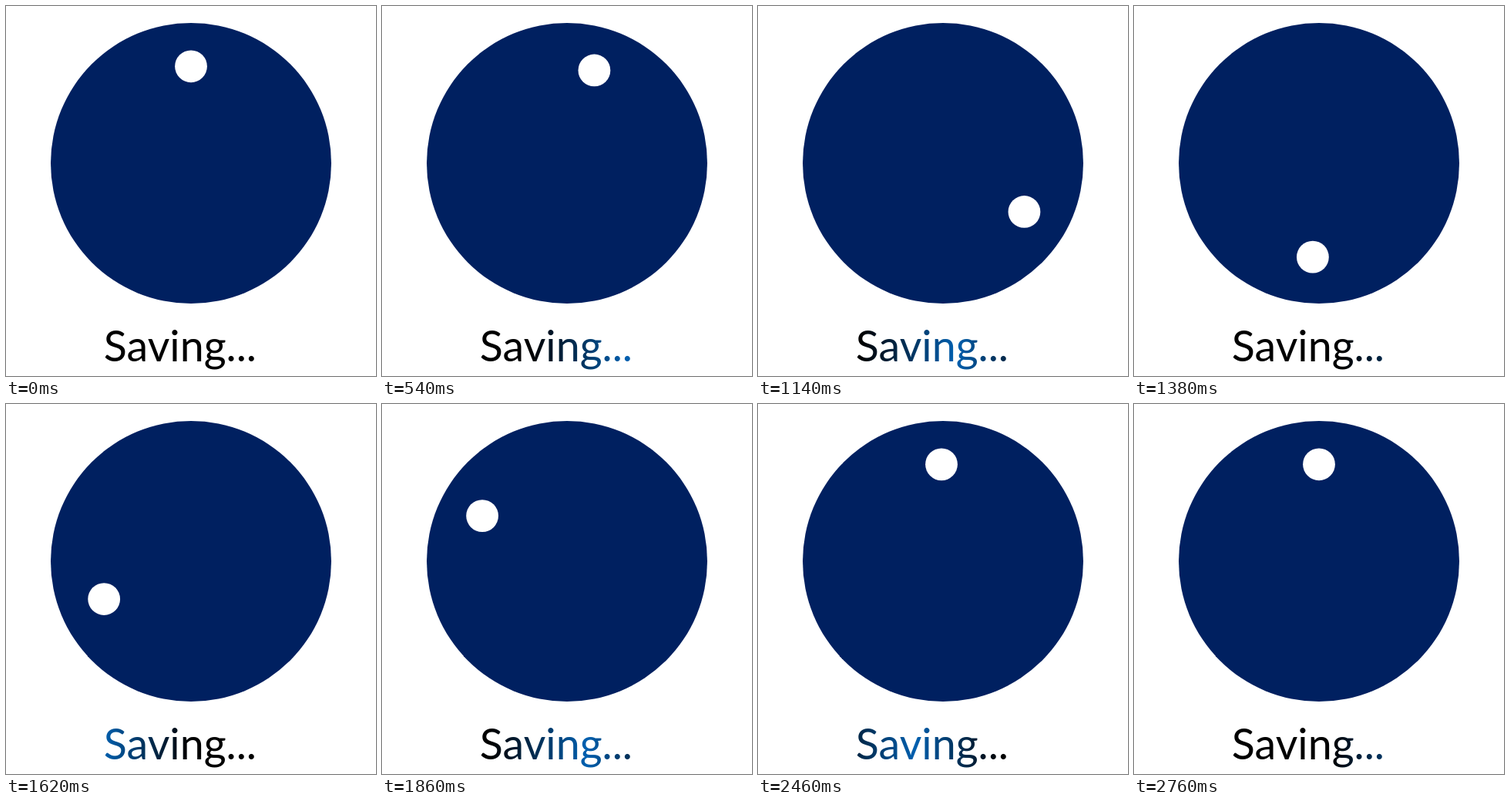
Recreate the animation shown at these times as an HTML page. Size 480 px wide and 480 px high, loop 2820 ms.

```html
<!DOCTYPE html>
<html lang="en">
<head>
<meta charset="utf-8">
<title>Saving</title>
<style>
  html, body { margin: 0; width: 100%; height: 100%; overflow: hidden; background: #fff; }
  svg { display: block; width: 100%; height: 100%; }
  text { font: 400 55.6px Lato, sans-serif; text-anchor: middle; }
</style>
</head>
<body>
<svg viewBox="0 0 480 480">
  <defs>
    <linearGradient id="shimmer" gradientUnits="userSpaceOnUse" y1="0" y2="0">
      <stop offset="0" stop-color="#000"/>
      <stop offset=".306" stop-color="#0060b0"/>
      <stop offset=".58" stop-color="#000"/>
      <stop offset="1" stop-color="#000"/>
    </linearGradient>
  </defs>
  <circle cx="240" cy="204" r="182" fill="#002060"/>
  <circle id="dot" r="20.9" fill="#fff"/>
  <text x="225.9" y="461" fill="url(#shimmer)">Saving...</text>
</svg>
<script>
  const LOOP = 2820, STEP = 60;
  const TURN = { start: 188, length: 2355, ramp: 0.41 };
  const SWEEP = { period: 705, speed: 0.58, from: 4, tail: 125 };
  const dot = document.getElementById("dot");
  const shimmer = document.getElementById("shimmer");

  // Constant acceleration, cruise, constant deceleration.
  function trapezoidEase(u, ramp) {
    if (u > 0.5) return 1 - trapezoidEase(1 - u, ramp);
    const cruise = 1 / (1 - ramp);
    return u < ramp ? cruise * u * u / (2 * ramp) : cruise * (u - ramp / 2);
  }

  function draw(time) {
    const progress = Math.min(1, Math.max(0, (time - TURN.start) / TURN.length));
    const angle = 2 * Math.PI * trapezoidEase(progress, TURN.ramp);
    dot.setAttribute("cx", 240 + 123.8 * Math.sin(angle));
    dot.setAttribute("cy", 202.1 - 123.8 * Math.cos(angle));

    const left = SWEEP.from + SWEEP.speed * (time % SWEEP.period) - SWEEP.tail;
    shimmer.setAttribute("x1", left);
    shimmer.setAttribute("x2", left + SWEEP.speed * SWEEP.period);
    // Nothing runs ahead of the first sweep.
    shimmer.setAttribute("spreadMethod", time < SWEEP.period ? "pad" : "repeat");
  }

  const origin = performance.now();
  function tick() {
    const time = (performance.now() - origin) % LOOP;
    draw(Math.floor(time / STEP) * STEP);
    requestAnimationFrame(tick);
  }
  tick();
</script>
</body>
</html>
```
